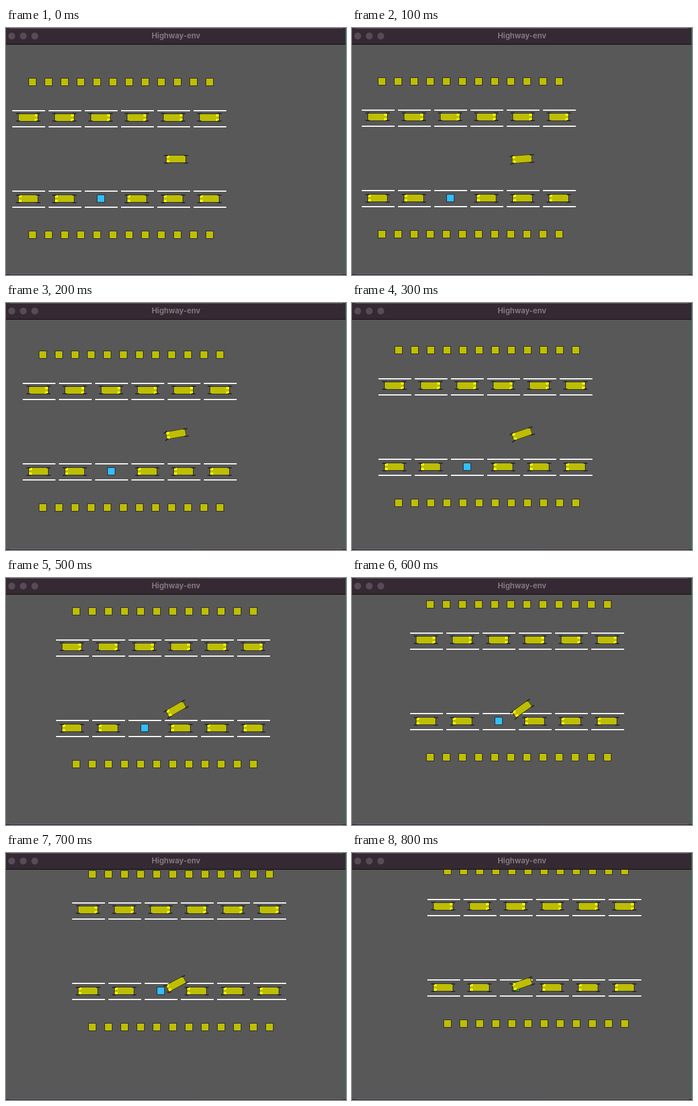
An HTML page with a canvas for the animation above (0.9 s loop, 591 by 430 pixels).

```html
<!DOCTYPE html>
<html lang="en">
<head>
<meta charset="utf-8">
<title>Highway-env</title>
<style>
html, body { margin: 0; width: 100%; height: 100%; overflow: hidden; background: #585858; }
canvas { display: block; }
</style>
</head>
<body>
<canvas id="stage" width="591" height="430"></canvas>
<script>
const ctx = document.getElementById('stage').getContext('2d');
const STEP_MS = 100;
const YELLOW = '#bebe00', LIGHT = '#ffff00', BLUE = '#32beff', GREEN = '#14b428', DARK = '#282828';

// Each step: scene offset x, y, then car heading and front wheel angle in degrees.
const STEPS = [
  [0, 0, 0, 0],
  [6, -1, -4, -20],
  [18, -4, -10, -24],
  [35, -12, -19, -20],
  [53, -24, -28, -7],
  [76, -36, -30, 0],
  [90, -48, -36, -5],
  [104, -57, -28, 25],
  [120, -63, -19, 33]
];
const radians = degrees => degrees * Math.PI / 180;

function fill(color, x, y, w, h) {
  ctx.fillStyle = color;
  ctx.fillRect(x, y, w, h);
}

function box(color, x, y, w, h) {
  fill(color, x, y, w, h);
  ctx.strokeStyle = DARK;
  ctx.lineWidth = 1;
  ctx.strokeRect(x + .5, y + .5, w - 1, h - 1);
}

function square(cx, cy, color = YELLOW) {
  box(color, cx - 7, cy - 7, 14, 14);
}

function tire(x, y, angle) {
  ctx.save();
  ctx.translate(x, y);
  ctx.rotate(radians(angle));
  fill(DARK, -3.5, -1, 7, 2);
  ctx.restore();
}

function car(cx, cy, heading, steering = 0) {
  ctx.save();
  ctx.translate(cx, cy);
  ctx.rotate(radians(heading));
  box(YELLOW, -17.5, -7, 35, 14);
  fill(LIGHT, 11.5, -6, 5, 4);
  fill(LIGHT, 11.5, 2, 5, 4);
  for (const y of [-7, 6]) {
    tire(-17.5, y, 0);
    tire(17.5, y, steering);
  }
  ctx.restore();
}

function parkingLot(goalColor) {
  for (let i = 0; i < 12; i++) {
    square(46 + 28 * i, 94);
    square(46 + 28 * i, 360);
  }
  for (let i = 0; i < 6; i++) {
    const x = 11 + 63 * i;
    for (const y of [143, 171, 283, 311]) fill('#fff', x, y, 57, 2);
    car(x + 27.5, 156, 0);
    if (i === 2) square(x + 28, 297, goalColor);
    else car(x + 27.5, 297, 180);
  }
}

function windowFrame() {
  fill('#352a33', 0, 0, 591, 28);
  fill('#62565f', 6, 0, 579, 1);
  fill('#080808', 0, 28, 591, 1);
  ctx.fillStyle = '#574c55';
  for (const x of [10, 30, 50]) {
    ctx.beginPath();
    ctx.arc(x, 14, 6, 0, 2 * Math.PI);
    ctx.fill();
  }
  ctx.fillStyle = '#81777e';
  ctx.font = '700 13px Inter, sans-serif';
  ctx.textAlign = 'center';
  ctx.textBaseline = 'alphabetic';
  ctx.fillText('Highway-env', 295.5, 18);

  fill('#28785a', 590, 0, 1, 429);
  fill('#777', 6, 428, 579, 1);
  fill('#170d40', 0, 429, 328, 1);
  fill('#28101f', 328, 429, 263, 1);
}

function draw(now) {
  const step = Math.floor(now / STEP_MS) % STEPS.length;
  const [dx, dy, heading, steering] = STEPS[step];
  fill('#585858', 0, 0, 591, 430);
  ctx.save();
  ctx.translate(dx, dy);
  parkingLot(step === STEPS.length - 1 ? GREEN : BLUE);
  ctx.restore();
  car(295.5, 228, 180 + heading, steering);
  windowFrame();
  requestAnimationFrame(draw);
}
draw(0);
</script>
</body>
</html>
```
